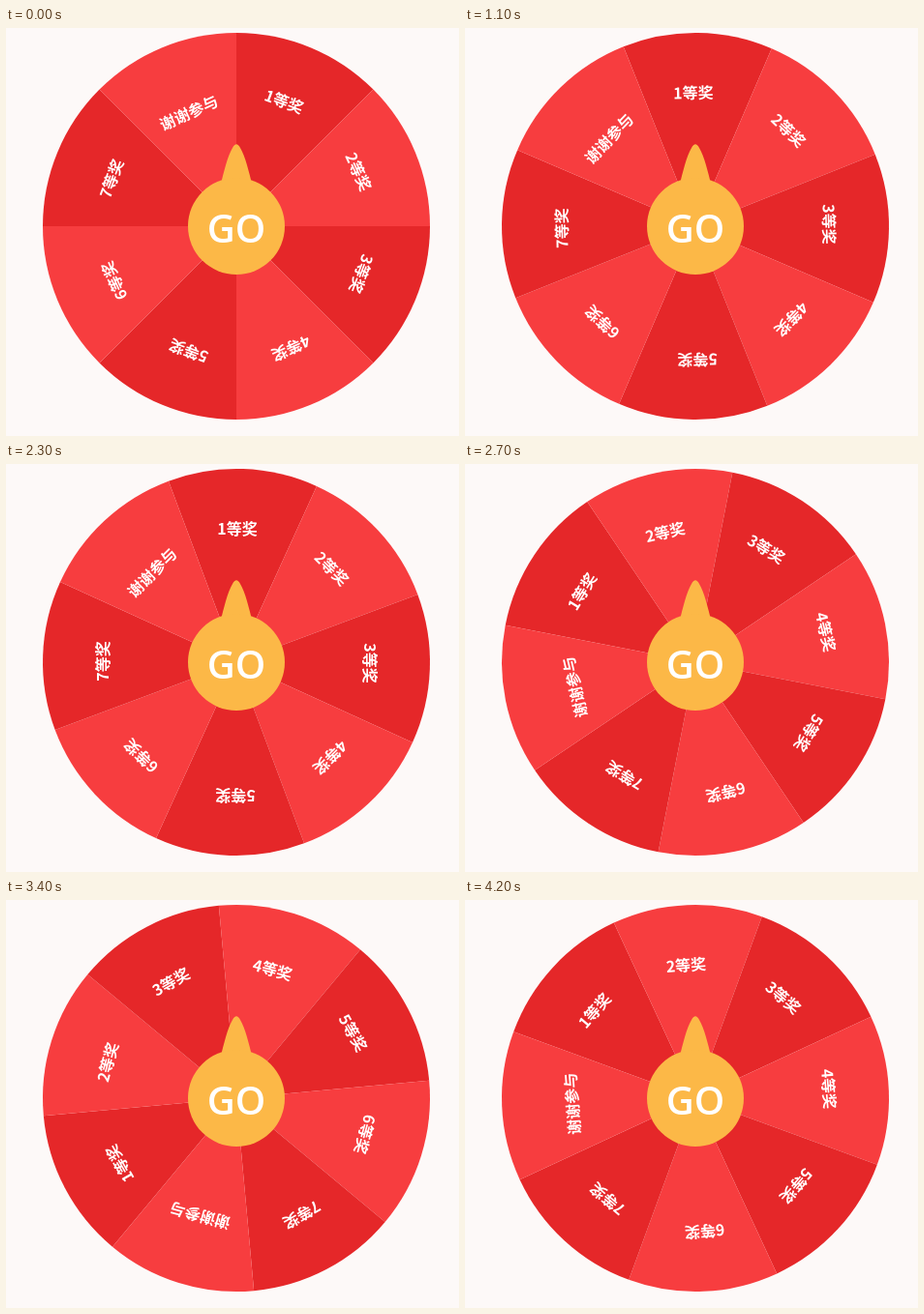
Animation, 468 px wide and 422 px high, one loop 4.3 s. Source, as an HTML page:

```html
<!DOCTYPE html>
<html lang="zh-CN">
<head>
<meta charset="utf-8">
<style>
  html, body { margin: 0; width: 100%; height: 100%; overflow: hidden; background: #fdf9f8; }
  svg { display: block; }
  text { fill: #fff; text-anchor: middle; }
  .label { font: bold 16px "Noto Sans CJK SC", "Noto Sans CJK", sans-serif; }
  .go { font: 600 40px "Open Sans", "Noto Sans", sans-serif; }
</style>
</head>
<body>
<svg width="468" height="422" viewBox="0 0 468 422">
  <g transform="translate(238 205)">
    <g id="wheel"></g>
    <path fill="#fcb847" d="M-16 -44C-13 -56 -9 -73 -4 -81Q0 -88.500 4 -81C9 -73 13 -56 16 -44Z"/>
    <circle r="50" fill="#fcb847"/>
    <text class="go" y="17">GO</text>
  </g>
</svg>
<script>
const LOOP = 4300, STEP = 100, START = 400;
const RADIUS = 200, SECTOR = 45;
const labels = ['1等奖', '2等奖', '3等奖', '4等奖', '5等奖', '6等奖', '7等奖', '谢谢参与'];
const wheel = document.getElementById('wheel');

// [step, angle in degrees, speed in degrees per step]: wind back, spin up, slow down
const knots = [
  [0.5, 0, -22],
  [7, -21.8, 18.3],
  [13, 226, 64],
  [19, 699.5, 82.5],
  [26, 1171.1, 46],
  [30, 1299.8, 24],
  [38, 1370.1, 1.5]
];

function add(parent, name, attrs) {
  const node = document.createElementNS('http://www.w3.org/2000/svg', name);
  for (const key in attrs) node.setAttribute(key, attrs[key]);
  return parent.appendChild(node);
}

function rimPoint(degrees) {
  const a = degrees * Math.PI / 180;
  return `${(RADIUS * Math.sin(a)).toFixed(3)} ${(-RADIUS * Math.cos(a)).toFixed(3)}`;
}

labels.forEach((_, i) => {
  const from = i * SECTOR;
  add(wheel, 'path', {
    d: `M0 0L${rimPoint(from)}A${RADIUS} ${RADIUS} 0 0 1 ${rimPoint(from + SECTOR)}Z`,
    fill: i % 2 ? '#f73d3f' : '#e52729'
  });
});

labels.forEach((label, i) => {
  const long = label.length > 3;
  add(wheel, 'text', {
    class: 'label',
    x: long ? 4 : 1,
    y: long ? -121 : -132,
    transform: `rotate(${(i + 0.5) * SECTOR - 2})`
  }).textContent = label;
});

function angleAt(step) {
  if (step <= knots[0][0]) return 0;
  const k = Math.max(1, knots.findIndex(knot => step <= knot[0]));
  const [s0, a0, v0] = knots[k - 1], [s1, a1, v1] = knots[k];
  const h = s1 - s0, u = (step - s0) / h, w = 1 - u;
  return w * w * ((1 + 2 * u) * a0 + u * h * v0) + u * u * ((3 - 2 * u) * a1 - w * h * v1);
}

function draw(time) {
  const step = Math.max(0, Math.floor((time % LOOP - START) / STEP));
  wheel.setAttribute('transform', `rotate(${angleAt(step).toFixed(2)})`);
}

const begin = performance.now();
function tick() {
  draw(performance.now() - begin);
  requestAnimationFrame(tick);
}
tick();
</script>
</body>
</html>
```
